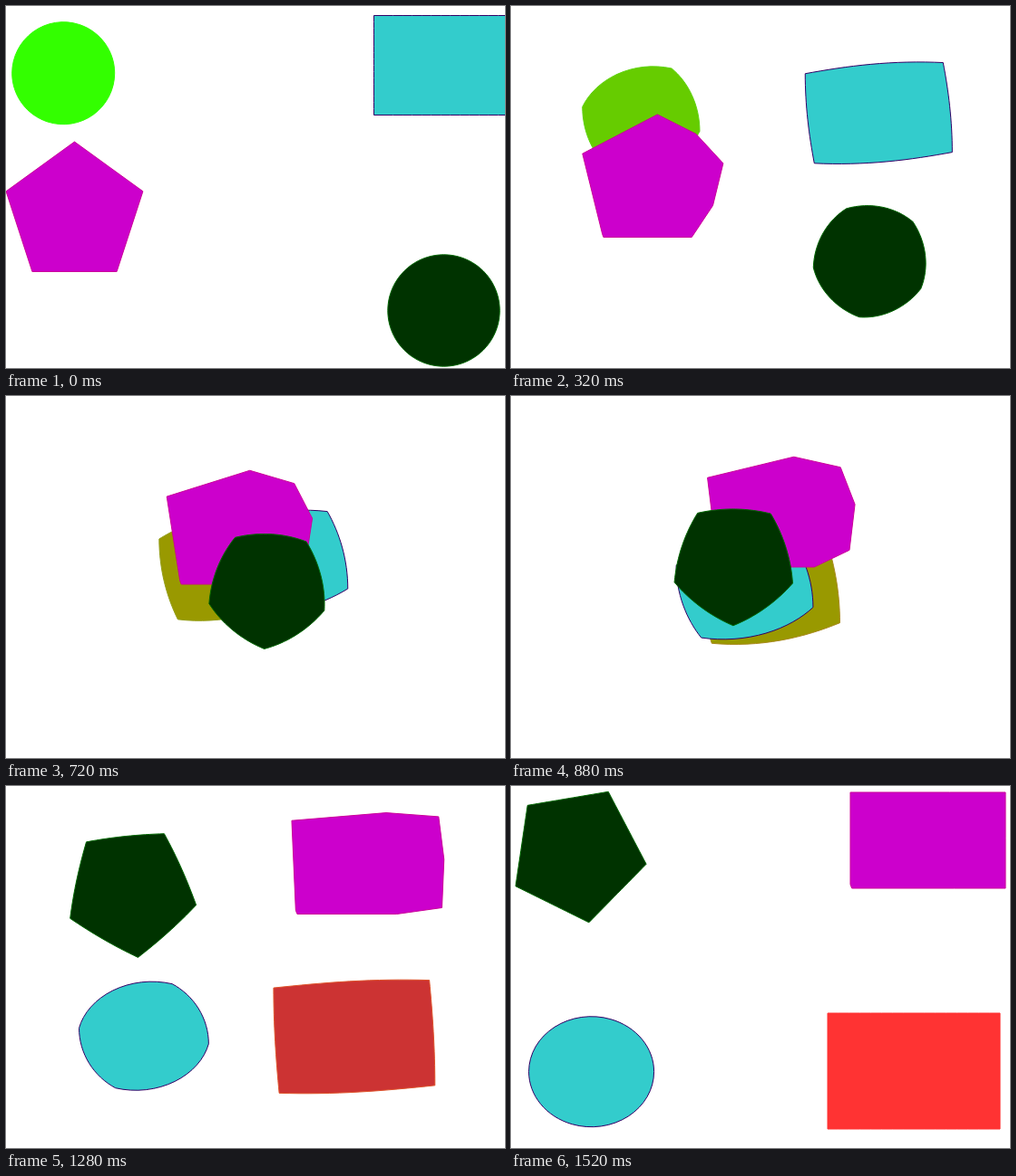
Write an HTML page that moves like this. It is 550x400 px and loops after 1.6 s.

```html
<!DOCTYPE html>
<html lang="en">
<head>
<meta charset="utf-8">
<title>Shape morph</title>
<style>
html, body { margin: 0; width: 100%; height: 100%; overflow: hidden; background: #fff; }
svg { display: block; }
</style>
</head>
<body>
<svg id="stage" width="550" height="400" viewBox="0 0 550 400"></svg>
<script>
const STEP = 80, STEPS = 20, CUTS = 16;
const stage = document.getElementById('stage');
const mix = (a, b, t) => a + (b - a) * t;
const mixAll = (a, b, t) => a.map((v, i) => mix(v, b[i], t));

// Point on an ellipse at an angle in degrees.
function polar(cx, cy, rx, ry, deg) {
  const a = deg * Math.PI / 180;
  return [cx + rx * Math.cos(a), cy + ry * Math.sin(a)];
}

const fifths = first => [0, 1, 2, 3, 4].map(i => first + 72 * i);
const pentagon = (cx, cy, r, first) => fifths(first).map(a => polar(cx, cy, r, r, a));
const box = (l, t, r, b) => [[l, t], [r, t], [r, b], [l, b]];

// Positions along an outline: 1.5 is halfway between corners 1 and 2.
const evenly = n => Array.from({ length: n * CUTS }, (_, i) => i / CUTS);

function along(corners, places = evenly(corners.length)) {
  return places.map(u => {
    const i = Math.floor(u), n = corners.length;
    return mixAll(corners[i % n], corners[(i + 1) % n], u - i);
  });
}

function ellipse(cx, cy, rx, ry, angles) {
  const ends = [...angles, angles[0] + 360];
  return evenly(angles.length).map(u => {
    const i = Math.floor(u);
    return polar(cx, cy, rx, ry, mix(ends[i], ends[i + 1], u - i));
  });
}

const rgb = c => `rgb(${c.map(Math.round).join()})`;
// Fill colours snap to the 216-colour cube.
const snap = c => c.map(v => Math.floor(v / 51 + 0.36) * 51);

const CORNERS = [180, 288, 360, 468];
const LIME = [51, 255, 0], RED = [255, 51, 51];

const shapes = [
  {
    from: ellipse(63.2, 74.2, 56.5, 56.5, CORNERS),
    to: along(box(349, 251, 539, 379)),
    blend: true
  },
  {
    from: along(box(405.5, 10.5, 574, 120.5)),
    to: ellipse(88.6, 315.7, 69, 61, CORNERS),
    fill: '#33cccc', line: '#330066'
  },
  {
    from: along(pentagon(75.5, 229.3, 79.3, 270), [0, 0.5, 1, 1.5, 2, 3, 3.04, 4]),
    to: along(box(374, 7, 545, 113), [0.64, 1, 1.48, 2, 2.33, 2.99, 3.04, 4]),
    fill: '#cc00cc', line: '#cc0099'
  },
  {
    from: ellipse(482.5, 336.5, 61.7, 61.7, fifths(252)),
    to: along(pentagon(73.1, 75.1, 76.8, 224.4)),
    fill: '#003300', line: '#006600'
  }
];

for (const s of shapes) {
  s.el = document.createElementNS('http://www.w3.org/2000/svg', 'path');
  s.el.setAttribute('fill', s.fill || 'none');
  s.el.setAttribute('stroke', s.line || 'none');
  s.el.setAttribute('stroke-linejoin', 'round');
  stage.append(s.el);
}

function draw(ms) {
  const t = Math.floor(ms / STEP) % STEPS / (STEPS - 1);
  for (const s of shapes) {
    const pts = s.from.map((p, i) =>
      mixAll(p, s.to[i], t).map(v => v.toFixed(2)).join(' '));
    s.el.setAttribute('d', 'M' + pts.join('L') + 'Z');
    if (s.blend) {
      const c = mixAll(LIME, RED, t);
      s.el.setAttribute('fill', rgb(snap(c)));
      s.el.setAttribute('stroke', rgb(c));
    }
  }
}

const start = performance.now();
function tick() {
  draw(performance.now() - start);
  requestAnimationFrame(tick);
}
draw(0);
requestAnimationFrame(tick);
</script>
</body>
</html>
```
